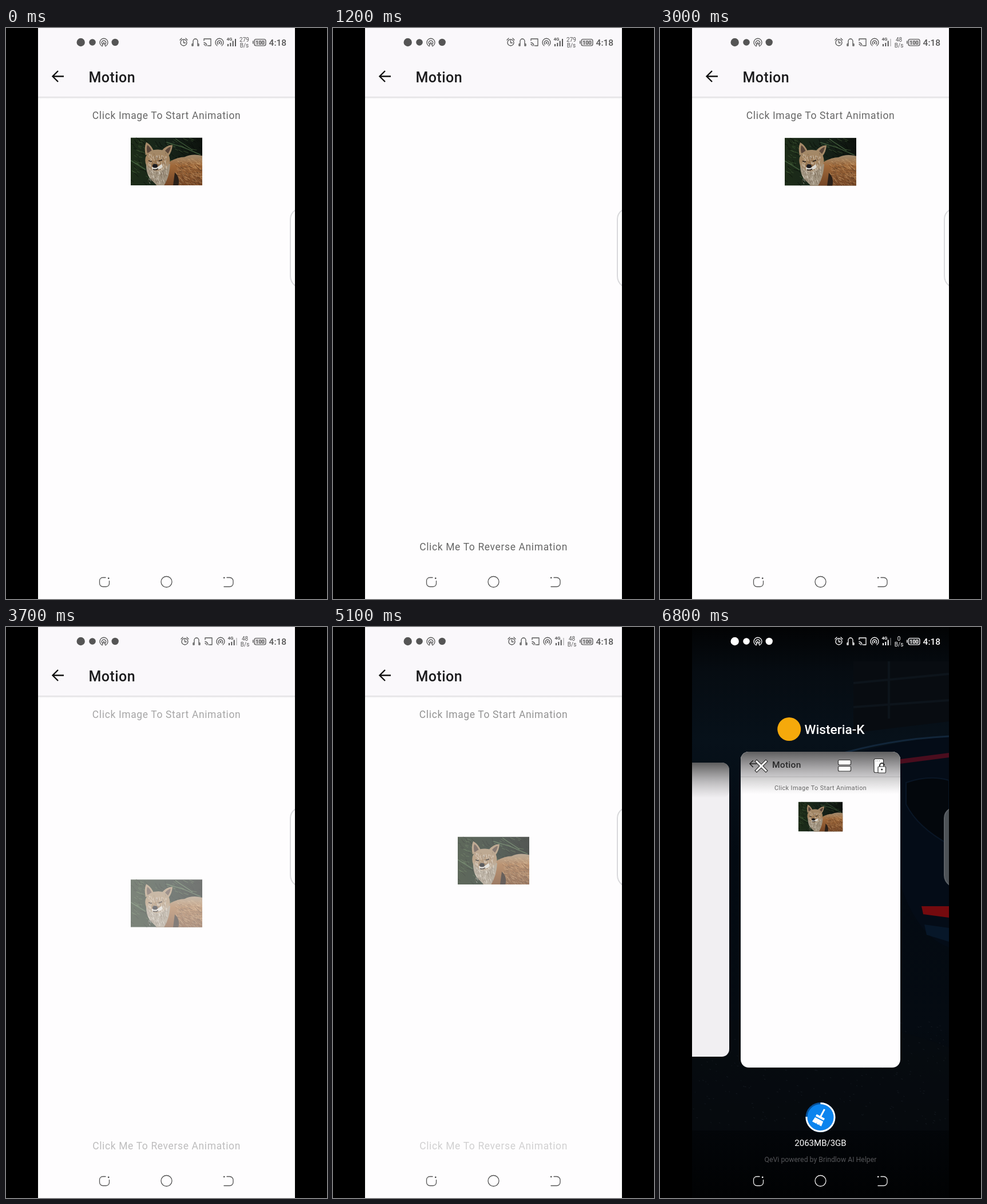
An HTML page that plays this animation: 561 by 998 pixels, repeating every 6900 ms.

```html
<!DOCTYPE html>
<html lang="en">
<head>
<meta charset="utf-8">
<title>Motion</title>
<style>
  html, body { margin: 0; width: 100%; height: 100%; overflow: hidden; background: #000; }
  svg { display: block; width: 561px; height: 998px; }
  text { font-family: Roboto, Arial, sans-serif; }
  .mid { text-anchor: middle; }
  .hint { font-size: 17.46px; letter-spacing: .65px; fill: #666; text-anchor: middle; }
  .line { fill: none; stroke: currentColor; stroke-width: 1.3; stroke-linecap: round; stroke-linejoin: round; }
  .hair { fill: none; stroke-width: .8; }
  #status text, #status .dot { fill: currentColor; }
</style>
</head>
<body>
<svg viewBox="0 0 561 998">
  <defs>
    <clipPath id="winClip"><rect id="win"/></clipPath>
    <clipPath id="photoClip"><rect width="125" height="83.5"/></clipPath>
    <clipPath id="screenClip"><rect x="56" width="449" height="998"/></clipPath>
    <linearGradient id="shade" x2="0" y2="1">
      <stop stop-color="#222" stop-opacity=".72"/><stop offset=".55" stop-color="#444" stop-opacity=".3"/>
      <stop offset="1" stop-color="#666" stop-opacity="0"/>
    </linearGradient>
    <linearGradient id="drop" x2="0" y2="1">
      <stop stop-color="#dcdbde"/><stop offset="1" stop-color="#fefdfe"/>
    </linearGradient>
    <linearGradient id="forest">
      <stop stop-color="#1d2c18"/><stop offset=".5" stop-color="#17241a"/><stop offset="1" stop-color="#0d120d"/>
    </linearGradient>
    <linearGradient id="coat" x2="0" y2="1">
      <stop stop-color="#a18b6f"/><stop offset=".35" stop-color="#a0693a"/><stop offset="1" stop-color="#744525"/>
    </linearGradient>
    <linearGradient id="face" x2="0" y2="1">
      <stop stop-color="#a48a6a"/><stop offset=".5" stop-color="#a3835f"/><stop offset="1" stop-color="#b3a692"/>
    </linearGradient>
    <linearGradient id="night" x2="0" y2="1">
      <stop stop-color="#020304"/><stop offset=".08" stop-color="#060c12"/><stop offset=".2" stop-color="#07111a"/>
      <stop offset=".4" stop-color="#030a12"/><stop offset=".7" stop-color="#050b12"/><stop offset="1" stop-color="#010203"/>
    </linearGradient>
  </defs>
  <rect width="561" height="998"/>

  <g clip-path="url(#screenClip)">
    <!-- dim wallpaper behind the task switcher -->
    <rect x="56" width="449" height="998" fill="url(#night)"/>
    <path d="M338 60H505V165L338 185Z" fill="#080c11"/>
    <path d="M338 98L505 82M338 140L505 128M400 60V160" stroke="#0d141b" stroke-width="4"/>
    <path d="M300 235Q400 198 505 192V560Q450 540 420 450Z" fill="#040c17"/>
    <path d="M300 226Q400 196 505 191" fill="none" stroke="#12263a" stroke-width="3"/>
    <path d="M420 231L505 220V228L420 239Z" fill="#4a0d1e"/>
    <path d="M430 272Q470 258 505 268V380Q450 350 430 310Z" fill="#03070c" stroke="#091626" stroke-width="2"/>
    <path d="M457 488H505V508L460 502Z" fill="#740a0e"/>
    <path d="M462 520L505 526V550L466 538Z" fill="#071729"/>
    <path d="M56 700Q280 650 505 735V880H56Z" fill="#080c11" opacity=".7"/>
    <path id="gravel" fill="none" stroke="#141a21" stroke-width="1"/>

    <g id="prev">
      <rect x="20" y="237" width="101" height="514" rx="13" fill="#f1eff2"/>
      <rect x="20" y="237" width="101" height="62" rx="13" fill="url(#shade)"/>
    </g>

    <g clip-path="url(#winClip)"><g id="app">
      <rect x="56" width="449" height="998" fill="#fefdfe"/>
      <rect x="56" width="449" height="121" fill="#faf8fb"/>
      <rect x="56" y="120" width="449" height="4" fill="url(#drop)"/>
      <path d="M101 84.500H82M91 75L81.500 84.500L91 94" fill="none" stroke="#111" stroke-width="2.400"/>
      <text x="144.400" y="95" font-size="25" font-weight="500" letter-spacing=".45" fill="#1b1b1d">Motion</text>
      <text id="startHint" class="hint" x="280.600" y="158.600">Click Image To Start Animation</text>
      <text id="backHint" class="hint" x="280.600" y="913.300">Click Me To Reverse Animation</text>
      <g id="photo"><g clip-path="url(#photoClip)">
        <rect width="125" height="83.500" fill="url(#forest)"/>
        <path id="shadows" class="hair" stroke="#0a0f0a"/>
        <path id="needles" class="hair" stroke="#4c6b3d" opacity=".7"/>
        <path d="M62 8L92 17L122 30M78 2L108 22M0 40L26 56" fill="none" stroke="#4f7048" stroke-width="1.500" opacity=".7"/>
        <path d="M68 42Q82 34 94 34Q108 27 126 32V84H44Q54 58 68 42Z" fill="url(#coat)"/>
        <path id="fur" class="hair" stroke="#cfa877" opacity=".55"/>
        <path id="darkFur" class="hair" stroke="#4c2f1c" opacity=".6"/>
        <path d="M77 61Q87 70 83 84H74Z" fill="#2a2019"/>
        <path d="M27 45Q26 66 38 76L46 84H58Q68 68 69 46Z" fill="#a0937f"/>
        <path d="M26 31Q23 17 27 8Q35 12 40 23ZM55 22Q63 13 73 13Q72 25 66 32Z" fill="#a68a69"/>
        <path d="M29 27Q27 19 29 13Q34 16 37 24ZM60 23Q65 17 70 16Q69 23 65 28Z" fill="#584539"/>
        <path d="M26 34Q32 21 46 21Q61 20 67 32Q71 43 64 52L49 61L33 56Q23 47 26 34Z" fill="url(#face)"/>
        <path d="M38 42Q46 35 54 42L52 56L42 59L35 53Z" fill="#98754f"/>
        <path id="ruff" class="hair" stroke="#e6dfd4" opacity=".7"/>
        <path id="creases" class="hair" stroke="#5d4b3a" opacity=".6"/>
        <path d="M36 52Q40 50 46 52L54 46L56 51Q50 58 39 57Z" fill="#dcd8d0"/>
        <ellipse cx="42.500" cy="49.500" rx="4.500" ry="3.500" fill="#1b1b1f"/>
        <path d="M31 40.500l6 1.500M49 41l6-2M39 55.500q4 2 9-1" fill="none" stroke="#2c231b" stroke-width="1.800"/>
      </g></g>
    </g></g>

    <g id="cardTop">
      <path d="M141 292V232a14 14 0 0 1 14-14H406a14 14 0 0 1 14 14V292Z" fill="url(#shade)"/>
      <g fill="#fff" stroke="#333" stroke-width="1.200">
        <path d="M169 232l8 8 8-8 3 3-8 8 8 8-3 3-8-8-8 8-3-3 8-8-8-8Z"/>
        <rect x="311.500" y="232.500" width="22" height="8.500" rx="2"/>
        <rect x="311.500" y="243.500" width="22" height="8.500" rx="2"/>
        <rect x="374" y="230.500" width="16.500" height="24" rx="2.500"/>
        <path d="M384 244v-2a4 4 0 0 1 8 0" fill="none" stroke-width="2"/>
        <rect x="381" y="244" width="13.500" height="11" rx="1.500"/>
      </g>
      <circle cx="387.700" cy="249" r="1.600" fill="#333"/>
      <path d="M377 234h1M380 234h1M383 234h1" stroke="#333"/>
    </g>

    <g id="header">
      <circle cx="225.700" cy="178.500" r="20.500" fill="#f5a90b"/>
      <text x="252.500" y="186.500" font-size="22.700" font-weight="500" fill="#fff">Wisteria-K</text>
    </g>

    <g id="cleaner">
      <circle cx="280.500" cy="857" r="24.500" fill="#0b84ee" stroke="#07519a" stroke-width="3"/>
      <path d="M280.500 832.500A24.500 24.500 0 1 1 256 856" fill="none" stroke="#fff" stroke-width="3"/>
      <g transform="translate(280 857) rotate(28)" fill="#fff">
        <path d="M-1.500-16h3v14h6.500v4h-16v-4h6.500ZM-8 4H8L9 13H5L4 10V13H0L-1 10V13H-9Z"/>
      </g>
      <text class="mid" x="280.500" y="906.500" font-size="15" fill="#fff">2063MB/3GB</text>
      <text class="mid" x="280.500" y="934.500" font-size="12.300" fill="#555659">QeVi powered by Brindlow AI Helper</text>
    </g>

    <path id="handle" d="M506 318Q497 324 497 334V434Q497 444 506 451Z" stroke-width="2"/>

    <g id="status">
      <circle class="dot" cx="130.700" cy="25" r="7.200"/>
      <circle class="dot" cx="151" cy="25" r="5.800"/>
      <g class="line">
        <path d="M167 31a7 7 0 1 1 8 0M168.500 28a3.500 3.500 0 1 1 5 0M168 32l3-7 3 7"/>
      </g>
      <circle class="dot" cx="190.700" cy="25" r="6.200"/>
      <g id="tray">
        <g class="line">
          <circle cx="310.500" cy="25.500" r="5.500"/><path d="M310.500 22v4h3M304 21l3-3M317 21l-3-3"/>
          <path d="M327 29v-6a4 4 0 0 1 8 0v6M325 28h2v3h-2ZM335 28h2v3h-2Z"/>
          <path d="M346 22v-3h12v12h-5M346 25.500a6 6 0 0 1 5 5.500M346 28.500a3 3 0 0 1 2.500 2.500"/>
          <path d="M369 31a7 7 0 1 1 8 0M370.500 28.500a3.700 3.700 0 1 1 5 0"/><circle cx="373" cy="26" r=".8"/>
        </g>
        <text x="385.500" y="21.500" font-size="8" font-weight="700">4G</text>
        <path class="dot" d="M387 28h2v4h-2ZM391.300 26h2v6h-2ZM395.700 22.500h2v9.500h-2Z"/>
        <path id="bar" class="dot" d="M400 19h2v13h-2Z"/>
      </g>
      <g id="speed" class="mid" font-size="10"><text id="rate" y="23.500"></text><text y="33.500">B/s</text></g>
      <path class="dot" d="M431 22.500h1.400v5h-1.400Z"/>
      <rect x="434" y="19.500" width="20" height="11.500" rx="3" fill="currentColor" fill-opacity=".18" stroke="currentColor" stroke-width="1.200"/>
      <text class="mid" x="444" y="28.700" font-size="9" font-weight="700">100</text>
      <text x="459.600" y="31" font-size="15.500" font-weight="500">4:18</text>
    </g>

    <rect id="pill" x="105" y="938" width="134" height="60" rx="30" fill="#f3f2f5"/>
    <g id="nav">
      <g class="line">
        <path d="M174 960.500h-5a5.500 5.500 0 0 0-5.500 5.500v4.500a6 6 0 0 0 6 6h5.500a5.500 5.500 0 0 0 5.500-5.500v-4.500"/>
        <circle cx="280.500" cy="968" r="9.500"/>
        <path d="M386 960.500h5a6 6 0 0 1 6 6v4a6 6 0 0 1-6 6h-10"/>
      </g>
      <path d="M178 960.500h2.400v2.400h-2.400ZM380 959.700h2.400v2.400h-2.400Z" fill="currentColor"/>
    </g>
  </g>
</svg>
<script>
const LOOP = 6900, STEP = 100, TRAVEL = 592;
const $ = id => document.getElementById(id);
const set = (id, attrs) => { for (const k in attrs) $(id).setAttribute(k, attrs[k]); };
const mix = (a, b, k) => a + (b - a) * k;
const ramp = (t, start, len) => Math.min(1, Math.max(0, (t - start) / len));

// cubic-bezier(.4, 0, .2, 1), solved by bisection
function ease(x) {
  let lo = 0, hi = 1;
  for (let i = 0; i < 24; i++) {
    const s = (lo + hi) / 2, r = 1 - s;
    if (1.2 * r * r * s + .6 * r * s * s + s * s * s < x) lo = s; else hi = s;
  }
  return lo * lo * (3 - 2 * lo);
}

// scatter n short strokes over a box
let seed = 7;
const rnd = () => (seed = seed * 16807 % 2147483647) / 2147483647;
function strokes(id, n, x, y, w, h, dx, dy) {
  let d = "";
  for (let i = 0; i < n; i++)
    d += `M${x + rnd() * w} ${y + rnd() * h}l${dx * (.5 + rnd())} ${dy * (rnd() + .3)}`;
  set(id, { d });
}
strokes("shadows", 120, 0, 0, 120, 80, 6, 7);
strokes("needles", 80, 0, 0, 110, 70, 6, 4);
strokes("fur", 150, 78, 36, 46, 46, 4, 3);
strokes("darkFur", 110, 78, 42, 46, 40, 4, 3);
strokes("ruff", 110, 30, 28, 33, 50, 1, 4);
strokes("creases", 60, 30, 26, 33, 52, 1, 4);
strokes("gravel", 260, 56, 690, 449, 180, 2, 1);

// each run moves the photo from one end to the other
const RUNS = [[70, 1000, 1], [2043, 1000, 0], [3380, 1000, 1], [4695, 900, 0]];
function progress(t) {
  let p = 0;
  for (const [start, len, to] of RUNS)
    if (t >= start) p = mix(1 - to, to, ease(ramp(t, start, len)));
  return p;
}

function draw(t) {
  const p = progress(t);
  set("photo", { transform: `translate(218 ${191.5 + TRAVEL * p})`, opacity: 1 - p });
  set("startHint", { opacity: 1 - p });
  set("backHint", { opacity: p });

  // the window shrinks into its task card
  const k = 1 - (1 - ramp(t, 6350, 250)) ** 2, dark = k > 0;
  const x = mix(56, 141, k), y = mix(0, 218, k), width = mix(449, 279, k), scale = width / 449;
  set("win", { x, y, width, height: mix(998, 552, k), rx: 14 * k });
  set("app", { transform: `translate(${x - 56 * scale} ${y - 50.6 * k * scale}) scale(${scale})` });
  set("prev", { transform: `translate(${-70 * (1 - k)} 0)`, opacity: k });
  const late = ramp(t, 6450, 150);
  set("cardTop", { opacity: late });
  set("cleaner", { opacity: late });
  set("header", { opacity: ramp(t, 6450, 250) });
  set("handle", { fill: dark ? "#4c5156" : "#fefefe", stroke: dark ? "#5c6166" : "#d9d9dc" });

  set("status", { color: dark ? "#fff" : "#555" });
  set("nav", { color: dark ? "#eee" : "#555" });
  set("pill", { opacity: dark ? 0 : ramp(t, 5950, 250) });
  const slow = t >= 2200;
  set("tray", { transform: `translate(${slow ? 2 : 0} 0)` });
  set("speed", { transform: `translate(${slow ? 417.6 : 416.5} 0)` });
  set("bar", { opacity: t >= 1700 ? .3 : 1 });
  $("rate").textContent = t >= 5200 ? "0" : slow ? "48" : "279";
}

const begin = performance.now();
function tick() {
  const t = (performance.now() - begin) % LOOP;
  draw(Math.floor(t / STEP) * STEP);
  requestAnimationFrame(tick);
}
tick();
</script>
</body>
</html>
```
